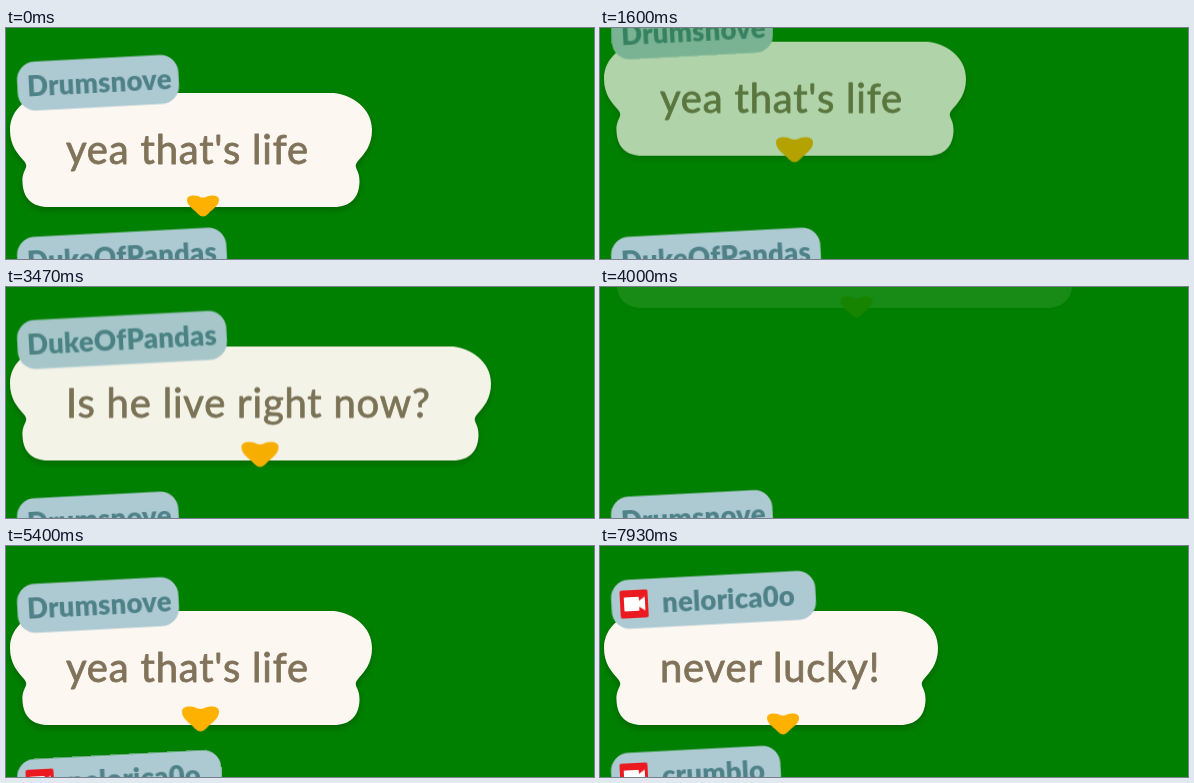
Write an HTML page that moves like this. It is 588x231 px and loops after 8000 ms.

```html
<!DOCTYPE html>
<html lang="en">
<head>
<meta charset="utf-8">
<title>Chat bubbles</title>
<style>
  html, body { margin: 0; width: 100%; height: 100%; overflow: hidden; background: #008000; }
  svg { display: block; }
  .bubble { fill: #fdf7f1; filter: drop-shadow(0 3px 3px rgba(0, 0, 0, .22)); }
  .heart { fill: #ffb100; transform-box: fill-box; transform-origin: center; }
  .tag rect { fill: #adc9d2; }
  .tag text { font: 900 27.5px Lato, sans-serif; fill: #4e8288; letter-spacing: .2px; }
  .line { font: 400 40px Lato, sans-serif; letter-spacing: .8px; fill: #80735a;
          stroke: #80735a; stroke-width: .8px; stroke-linejoin: round; }
  .tag .badge { fill: #eb1a20; }
  .camera { fill: #fff; }
</style>
</head>
<body>
<svg id="stage" width="588" height="231" viewBox="0 0 588 231"></svg>
<script>
const LOOP = 8000, ROW = 174, MOVE = 800;
const stage = document.getElementById('stage');

// Each step: [ms, row, opacity, easing towards the next step]
const hold = (ms, row) => [ms, row, 1];
const enter = ms => [[ms, 2, 1, 'ease-in-out'], hold(ms + MOVE, 1)];
const leave = (ms, row) => [[ms, row, 1, 'ease-in-out'], [ms + MOVE, row - 1, 0]];
const jump = (ms, row) => [hold(ms, row), hold(ms, row - 1)];

const JUMPS = [2300, 4400, 6450];
const messages = [
  { name: 'Drumsnove', tag: 161.5, line: "yea that's life", right: 366,
    steps: [hold(0, 0), ...leave(1300, 0)] },
  { name: 'DukeOfPandas', tag: 209.5, line: 'Is he live right now?', right: 485,
    steps: [hold(0, 1), ...jump(JUMPS[0], 1), ...leave(3370, 0)] },
  { name: 'Drumsnove', tag: 161.5, line: "yea that's life", right: 366,
    steps: [hold(0, 2), ...enter(JUMPS[0]), ...jump(JUMPS[1], 1), ...jump(JUMPS[2], 0), ...leave(7000, -1)] },
  { name: 'nelorica0o', tag: 204.5, line: 'never lucky!', right: 338, badge: true,
    steps: [hold(0, 2), ...enter(JUMPS[1]), ...jump(JUMPS[2], 1)] },
  { name: 'crumblo', tag: 169.5, line: 'haha same', right: 320, badge: true,
    steps: [hold(0, 2), ...enter(JUMPS[2])] }
];

function bubblePath(right) {
  const r = d => right - d, l = d => 4 + d;
  return `M${l(38)} 65H${r(38)}C${r(20)} 67 ${r(0)} 80 ${r(0)} 102
    C${r(0)} 118 ${r(8)} 126 ${r(14)} 133C${r(20)} 140 ${r(12)} 141 ${r(12.5)} 154
    C${r(13)} 170 ${r(22)} 179 ${r(38)} 179H${l(38)}
    C${l(22)} 179 ${l(13)} 170 ${l(12.5)} 154C${l(12)} 141 ${l(20)} 140 ${l(14)} 133
    C${l(8)} 126 ${l(0)} 118 ${l(0)} 102C${l(0)} 80 ${l(20)} 67 ${l(38)} 65Z`;
}

const heartPath = 'M-16 172C-16 167-9 167-5 168Q0 171 5 168C9 167 16 167 16 172' +
  'C16 178 8 182 5 186Q0 191-5 186C-8 182-16 178-16 172Z';

const badge = `<rect class="badge" x="20" y="39" width="28" height="28" rx="2"/>
  <path class="camera" d="M25 46H38Q39 46 39 47V50L45 46V60L39 56V59Q39 60 38 60H25Q24 60 24 59V47Q24 46 25 46Z"/>`;

function draw(m) {
  const middle = 11.3 + m.tag / 2;
  const g = document.createElementNS('http://www.w3.org/2000/svg', 'g');
  g.innerHTML = `
    <path class="bubble" d="${bubblePath(m.right)}"/>
    <text class="line" x="60" y="136">${m.line}</text>
    <g transform="translate(${(m.right + 4) / 2 + 12} 0)"><path class="heart" d="${heartPath}"/></g>
    <g class="tag"><g transform="rotate(-3 ${middle} 53)">
      <rect x="11.3" y="28.5" width="${m.tag}" height="49" rx="18"/>
      ${m.badge ? badge : ''}
      <text x="${m.badge ? 62 : 21}" y="63">${m.name}</text>
    </g></g>`;
  stage.append(g);
  return g;
}

function animate(g, steps) {
  const [, row, opacity] = steps[steps.length - 1];
  const frames = [...steps, [LOOP, row, opacity]].map(([ms, row, opacity, easing = 'linear']) => (
    { offset: ms / LOOP, transform: `translateY(${row * ROW}px)`, opacity, easing }));
  g.animate(frames, { duration: LOOP, iterations: Infinity });

  // Name tag floats up and down.
  g.querySelector('.tag').animate(
    { transform: ['translateY(-.9px)', 'translateY(6.5px)'] },
    { duration: 800, delay: -328, iterations: Infinity, direction: 'alternate',
      easing: 'cubic-bezier(.37, 0, .63, 1)' });

  // Heart switches between two poses.
  const small = 'translate(0px, 0px) scale(1)', big = 'translate(-2.5px, -5px) scale(1.16, 1.19)';
  g.querySelector('.heart').animate(
    [{ transform: big, offset: 0 }, { transform: big, offset: .5 },
     { transform: small, offset: .5 }, { transform: small, offset: 1 }],
    { duration: 2000, delay: -1250, iterations: Infinity });
}

for (const m of messages) animate(draw(m), m.steps);
</script>
</body>
</html>
```
